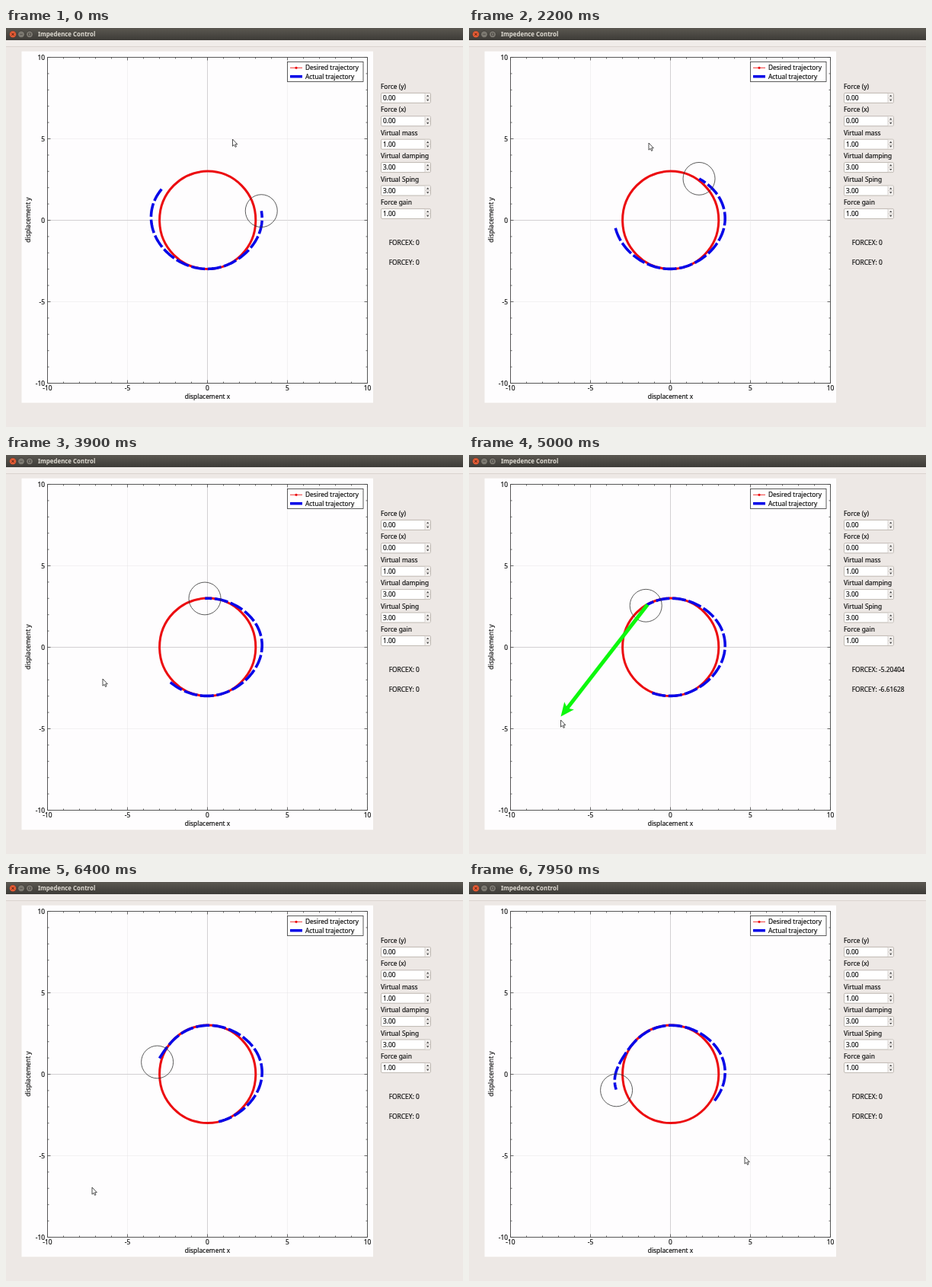
An HTML page for the animation above (8 s loop, 600 px wide and 524 px high).

```html
<!DOCTYPE html>
<html lang="en">
<head>
<meta charset="utf-8">
<title>Impedence Control</title>
<style>
html, body { margin: 0; width: 100%; height: 100%; overflow: hidden; background: #ede8e5; }
svg { display: block; width: 100vw; height: 100vh; }
text { font: 8.4px "Noto Sans", "Open Sans", sans-serif; fill: #111; stroke: #111; stroke-width: .18; white-space: pre; }
.title { font-size: 7.9px; font-weight: 700; fill: #dfdbd2; stroke: none; }
.mid { text-anchor: middle; }
.end { text-anchor: end; }
</style>
</head>
<body>
<svg id="stage" viewBox="0 0 600 524" xmlns="http://www.w3.org/2000/svg">
  <defs>
    <linearGradient id="bar" x2="0" y2="1">
      <stop offset="0" stop-color="#5b5851"/><stop offset="1" stop-color="#3d3b37"/>
    </linearGradient>
  </defs>
  <rect width="600" height="524" fill="#ede8e5"/>
  <rect y="16" width="600" height="8" fill="#f0ece9"/>
  <path d="M0 24.5H600" stroke="#dad4cf"/>
  <rect width="600" height="16" fill="url(#bar)"/>
  <circle cx="9" cy="8.3" r="4.5" fill="#e65c35" stroke="#34322e" stroke-width=".5"/>
  <path d="M7.4 6.7l3.2 3.2m0-3.2l-3.2 3.2" stroke="#512012"/>
  <g fill="#7d7a72" stroke="#34322e" stroke-width=".6">
    <circle cx="20" cy="8.3" r="4.4"/><circle cx="31" cy="8.3" r="4.4"/>
    <path d="M18.3 8.3h3.4M29.5 6.9h3v2.8h-3z" fill="none"/>
  </g>
  <text class="title" x="42" y="11.4">Impedence Control</text>
  <rect x="20.5" y="30.7" width="461.5" height="461.5" fill="#fefdfe"/>
  <g id="axes"></g>
  <ellipse cx="264.7" cy="252.3" rx="63.1" ry="64.2" fill="none" stroke="#ec0c10" stroke-width="3"/>
  <path id="trail" fill="none" stroke="#0808e8" stroke-width="3.6" stroke-linecap="square" stroke-dasharray="14.4 7.2"/>
  <ellipse id="robot" rx="21" ry="21.4" fill="none" stroke="#333" stroke-width=".8"/>
  <g id="arrow">
    <path id="shaft" stroke="#0cf80c" stroke-width="5"/>
    <path id="point" d="M0 0L-18 -8L-14 0L-18 8Z" fill="#0cf80c"/>
  </g>
  <rect x="369.5" y="44.5" width="99.5" height="26" fill="#fff" stroke="#333" stroke-width=".8"/>
  <path d="M373 52.3h16" stroke="#ec1c1c" stroke-width=".9"/>
  <circle cx="381" cy="52.3" r="1.6" fill="#ec0c10"/>
  <path d="M373 63.7h16" stroke="#0808e8" stroke-width="3.6"/>
  <text x="393" y="55.3">Desired trajectory</text>
  <text x="393" y="66.7">Actual trajectory</text>
  <g id="panel"></g>
  <text id="forceX" x="502.7" y="285"></text>
  <text id="forceY" x="502.7" y="310.7"></text>
  <path id="cursor" d="M0 0V9.2L2.1 7.3L3.6 10.4L5 9.7L3.6 6.7H6.3Z" fill="#fff" stroke="#222" stroke-width=".8"/>
</svg>
<script>
const $ = id => document.getElementById(id);
const LOOP = 8, STEP = 0.05;
const CX = 264.7, CY = 252.3, UX = 21, UY = 21.4;
const PRESS = 4.6, RELEASE = 6.1;

const bump = (x, center, width) => Math.exp(-(((x - center) / width) ** 2) / 2);

// Angles in degrees, time in seconds; the push speeds the robot up for a while
const headAngle = t => 369.6 + 19.6 * t + 0.48 * t * t + 12.2 * bump(t, 6.3, 0.65);
const tailAngle = t => 148 + 18.5 * t + 0.071 * t ** 3;

// The path bulges outward at each side of the circle
const radius = deg => 2.98 + 0.57 * bump(deg, 170, 36) + 0.43 * bump(deg, 366, 31) + 0.56 * bump(deg, 552, 20);

// Stops of the pointer: seconds, x, y
const POINTER = [[0, 297.5, 146], [1.1, 255, 149], [2.2, 236, 151], [3.9, 127, 294], [4.6, 125, 311],
  [5, 120.5, 348], [6, 104, 373], [6.4, 113, 401], [7.65, 326, 407], [7.95, 362, 361]];

function pointerAt(t) {
  const next = Math.max(1, POINTER.findIndex(stop => stop[0] >= t));
  const [t0, x0, y0] = POINTER[next - 1], [t1, x1, y1] = POINTER[next];
  const u = (t - t0) / (t1 - t0);
  return [x0 + (x1 - x0) * u, y0 + (y1 - y0) * u];
}

function pathPoint(deg) {
  const r = radius(deg), a = deg * Math.PI / 180;
  return [CX + UX * r * Math.cos(a), CY - UY * r * Math.sin(a)];
}

function trailPath(from, to) {
  const n = Math.ceil((to - from) / 2);
  return "M" + Array.from({ length: n + 1 }, (_, i) =>
    pathPoint(from + (to - from) * i / n).map(v => v.toFixed(2)).join(" ")).join("L");
}

function buildAxes() {
  const line = (d, stroke, extra = "") => `<path d="${d}" fill="none" stroke="${stroke}" ${extra}/>`;
  const text = (x, y, s, cls) => `<text x="${x}" y="${y}" class="${cls}">${s}</text>`;
  const left = 54.5, right = 474.5, top = 38.5, bottom = 466.5;
  let out = "", ticks = "";
  for (let v = -10; v <= 10; v++) {
    const x = 264.5 + v * UX, y = 252.5 - v * UY, len = v % 5 ? 2 : 4;
    ticks += `M${x} ${bottom}v${-len}M${x} ${top}v${len}M${left} ${y}h${len}M${right} ${y}h${-len}`;
    if (v % 5) continue;
    if (Math.abs(v) < 10) {
      out += line(`M${x} ${top}V${bottom}M${left} ${y}H${right}`, v ? "#e6e4e6" : "#d2d0d2",
        v ? 'stroke-dasharray="1 1"' : "");
    }
    out += text(x, 475.5, v, "mid") + text(51, y + 3, v, "end");
  }
  out += line(`M${left} ${top}H${right}V${bottom}H${left}Z`, "#444", 'stroke-width=".9"');
  out += line(ticks, "#444", 'stroke-width=".8"');
  out += text(264.5, 487, "displacement x", "mid");
  out += '<text class="mid" transform="translate(32 252) rotate(-90)">displacement y</text>';
  $("axes").innerHTML = out;
}

function buildPanel() {
  const rows = [["Force (y)", "0.00"], ["Force (x)", "0.00"], ["Virtual mass", "1.00"],
    ["Virtual damping", "3.00"], ["Virtual Sping", "3.00"], ["Force gain", "1.00"]];
  $("panel").innerHTML = rows.map(([label, value], i) => `<g transform="translate(492 ${76.9 + 30.4 * i})">
    <text y="3">${label}</text>
    <rect x=".5" y="8.5" width="65" height="13" rx="1.5" fill="#fff" stroke="#b8b1ab" stroke-width=".9"/>
    <path d="M58 9h7v12h-7z" fill="#f3f0ee"/><path d="M58 9v12M58 15h7" stroke="#cbc5c0" stroke-width=".7"/>
    <path d="M60 13.2h3.4l-1.7-2.2zM60 16.8h3.4l-1.7 2.2z" fill="#444"/>
    <text x="3" y="18.2">${value}</text></g>`).join("");
}

function render(t) {
  const [hx, hy] = pathPoint(headAngle(t));
  const [px, py] = pointerAt(t);
  const drawnAngle = headAngle(t - 0.08);
  $("trail").setAttribute("d", trailPath(tailAngle(t), drawnAngle));
  $("robot").setAttribute("cx", hx);
  $("robot").setAttribute("cy", hy);
  $("cursor").setAttribute("transform", `translate(${px} ${py})`);

  const pushed = t >= PRESS && t < RELEASE;
  $("arrow").style.display = pushed ? "" : "none";
  if (pushed) {
    const [sx, sy] = pathPoint(drawnAngle);
    const tx = px, ty = py - 4.5, angle = Math.atan2(ty - sy, tx - sx);
    $("shaft").setAttribute("d", `M${sx} ${sy}L${tx - 12 * Math.cos(angle)} ${ty - 12 * Math.sin(angle)}`);
    $("point").setAttribute("transform", `translate(${tx} ${ty}) rotate(${angle * 180 / Math.PI})`);
  }
  const show = v => pushed ? v.toFixed(5) : "0";
  $("forceX").textContent = "FORCEX: " + show((px + 2.433 - hx) / UX);
  $("forceY").textContent = "FORCEY: " + show((hy - py + 8.658) / UY);
}

buildAxes();
buildPanel();
const start = performance.now();
function tick(now) {
  const t = Math.max(0, now - start) / 1000 % LOOP;
  render(Math.floor(t / STEP + 1e-6) * STEP);
  requestAnimationFrame(tick);
}
render(0);
requestAnimationFrame(tick);
</script>
</body>
</html>
```
